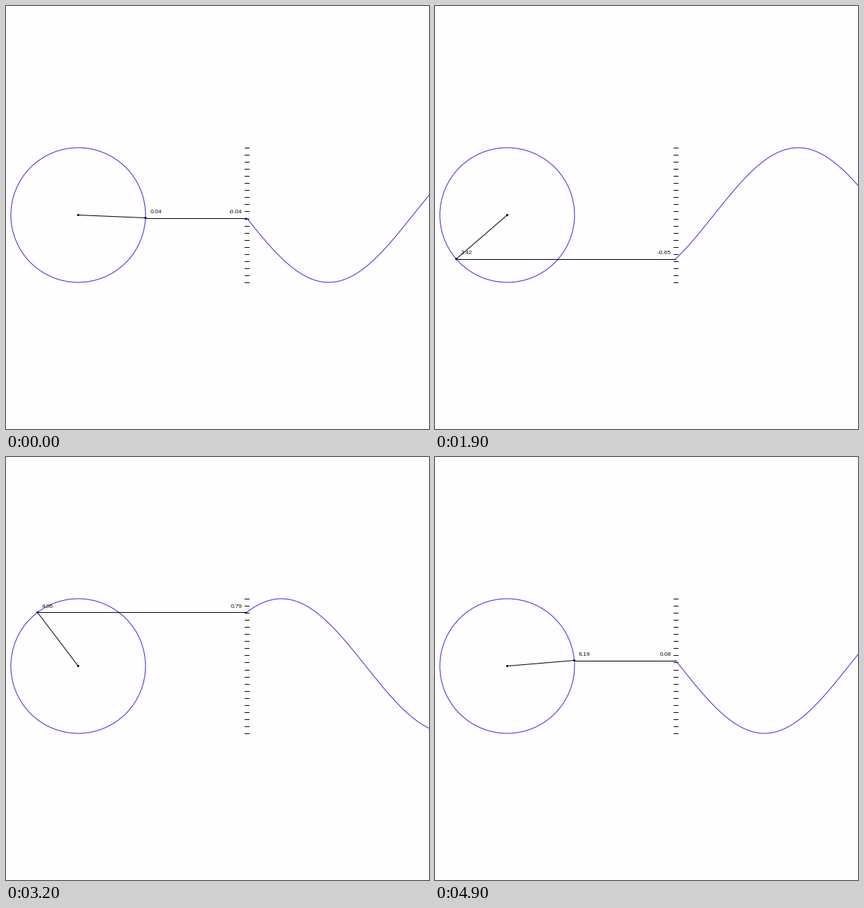
A matplotlib script that plays this animation: 600 px wide and 600 px high, repeating every 5 s.

```python
import math

import matplotlib.pyplot as plt
import numpy as np
from matplotlib.animation import FuncAnimation
from matplotlib.patches import Circle

SIZE, DPI = 600, 100
FRAMES, INTERVAL = 50, 100
CX, CY, RADIUS = 102.4, 296.5, 95.5
AXIS_X = 341.2
WAVE_K = 0.01313
START_ANGLE = 0.042
BACKGROUND, BLUE, BLACK = "#fefdff", "#4424d6", "#000000"


def px(pixels):
    """Convert pixels to points."""
    return pixels * 72 / DPI


def truncated(value):
    """Two decimals, cut off rather than rounded."""
    return f"{math.trunc(value * 100) / 100:.2f}"


fig = plt.figure(figsize=(SIZE / DPI, SIZE / DPI), dpi=DPI, facecolor=BACKGROUND)
ax = fig.add_axes([0, 0, 1, 1])
ax.set_xlim(0, SIZE)
ax.set_ylim(SIZE, 0)
ax.axis("off")

ax.add_patch(Circle((CX, CY), RADIUS, fill=False, ec=BLUE, lw=px(1)))
ax.hlines(np.linspace(CY - RADIUS, CY + RADIUS, 20), AXIS_X - 3.7, AXIS_X + 3.5,
          colors=BLACK, lw=px(1))

wave_x = np.linspace(AXIS_X, SIZE + 5, 300)
wave, = ax.plot([], [], color=BLUE, lw=px(1))
radius_line, = ax.plot([], [], color=BLACK, lw=px(1))
level_line, = ax.plot([], [], color=BLACK, lw=px(1))
ax.add_patch(Circle((CX, CY), 1.5, color=BLACK, lw=0))
dot = ax.add_patch(Circle((CX, CY), 1.5, color=BLACK, lw=0, zorder=3))

label_style = dict(family="Liberation Sans", fontsize=px(8.4), color="#111111",
                   va="baseline")
angle_label = ax.text(0, 0, "", ha="left", **label_style)
sine_label = ax.text(0, 0, "", ha="right", **label_style)


def update(frame):
    angle = START_ANGLE + 2 * math.pi * frame / FRAMES
    x = CX + RADIUS * math.cos(angle)
    y = CY + RADIUS * math.sin(angle)

    radius_line.set_data([CX, x], [CY, y])
    level_line.set_data([x, AXIS_X], [y, y])
    dot.center = x, y
    wave.set_data(wave_x, CY + RADIUS * np.sin(angle + WAVE_K * (wave_x - AXIS_X)))

    angle_label.set_position((x + 6.5, y - 6.5))
    angle_label.set_text(truncated(angle))
    sine_label.set_position((AXIS_X - 6.4, y - 6.5))
    sine_label.set_text(truncated(-math.sin(angle)))
    return wave, radius_line, level_line, dot, angle_label, sine_label


animation = FuncAnimation(fig, update, frames=FRAMES, interval=INTERVAL,
                          repeat=True, repeat_delay=0)
plt.show()
```
